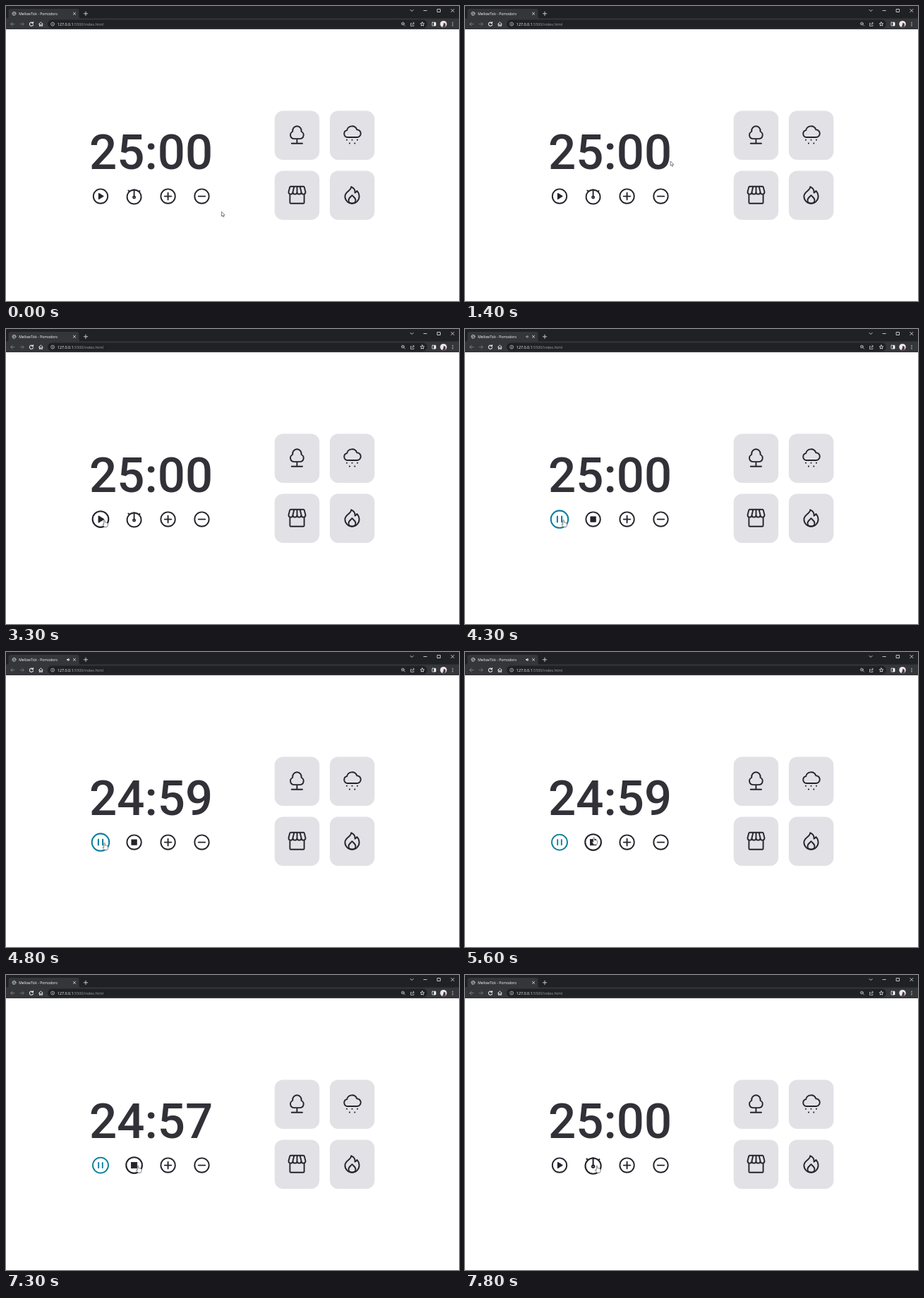
These frames come from a looping animation (642 px wide and 418 px high, 8000 ms). An HTML page:

```html
<!DOCTYPE html>
<html lang="en">
<head>
<meta charset="utf-8">
<title>MellowTick - Pomodoro</title>
<style>
  html, body { margin: 0; width: 100%; height: 100%; overflow: hidden; background: #fff; }
  svg { display: block; }
  .ui { font-family: "Open Sans", "Noto Sans", sans-serif; }
  .line { fill: none; stroke-linecap: round; stroke-linejoin: round; }
  .icon { stroke: #25242c; stroke-width: 1.9; }
  #clock { font: 500 69px Roboto, sans-serif; fill: #323138; }
</style>
</head>
<body>
<svg width="642" height="418" viewBox="0 0 642 418">
  <defs>
    <g id="ring"><circle class="line" r="10.2"/></g>
    <rect id="card" width="63.5" height="69.5" rx="12" fill="#e1e1e6"/>
  </defs>
  <rect width="642" height="418" fill="#fff"/>

  <!-- browser frame -->
  <rect width="642" height="33" fill="#202124"/>
  <path d="M0 17.5H1.5Q3.5 17.5 3.5 15.5V7Q3.5 4 6.5 4H100.5Q103.5 4 103.5 7V15.5Q103.5 17.5 105.5 17.5H642V33H0Z" fill="#35363a"/>
  <rect x="59" y="19.5" width="538" height="12" rx="6" fill="#202124"/>
  <g class="ui">
    <text x="18.3" y="12.6" font-size="5" fill="#fff">MellowTick - Pomodoro</text>
    <text x="72.8" y="27.6" font-size="5.4" fill="#fff">127.0.0.1<tspan fill="#9aa0a6">:5500/index.html</tspan></text>
  </g>
  <g class="line" stroke="#dfe1e5" stroke-width=".85">
    <g stroke="#b4b7bb"><circle cx="11.5" cy="10.8" r="2.5"/><path d="M9.2 10.2l2.2.6-.4 2.3M11.3 8.5l.8 1.5 1.8.2"/></g>
    <path d="M95.4 9.2l3.2 3.2m0-3.2l-3.2 3.2M110.3 10.8h5.4m-2.7-2.7v5.4"/>
    <path d="M573 5.4l2.1 2.1 2.1-2.1M592 6.5h4.3M611.5 4.5h4v4h-4zM630.8 4.4l4.2 4.2m0-4.2l-4.2 4.2"/>
    <path d="M12 25.6H6.8m2.4-2.5l-2.5 2.5 2.5 2.5" stroke="#85888c"/>
    <path d="M20 25.6h5.2m-2.4-2.5l2.5 2.5-2.5 2.5" stroke="#74777b"/>
    <path d="M38 24.1a2.6 2.6 0 1 0 .5 2.2M38.5 22.6v1.9h-1.9" stroke-width="1.1"/>
    <path d="M46.6 25.6l2.8-2.6 2.8 2.6M47.4 25.2v3.2h1.4v-1.9h1.2v1.9h1.4v-3.2" stroke-width="1"/>
    <g stroke="#aeb1b5"><circle cx="66.1" cy="25.6" r="2.5"/><path d="M66.1 25.4v1.5M66.1 24.2v.05"/></g>
    <g stroke="#b9bcc0">
      <circle cx="562.4" cy="25" r="1.9"/><path d="M563.8 26.4l1.7 1.7M561.6 25h1.6"/>
      <path d="M574.6 24.4h-1.1v4h4.4v-1.5M575.2 26.4q.3-2 3-2.1m-1.2-1.3l1.4 1.3-1.4 1.3"/>
    </g>
    <path d="M590 22.8l.8 1.8 2 .2-1.5 1.3.4 2-1.7-1-1.7 1 .4-2-1.5-1.3 2-.2z"/>
    <rect x="604" y="23.2" width="5" height="4.8" rx=".4"/>
  </g>
  <rect x="606.6" y="23.2" width="2.4" height="4.8" fill="#fff"/>
  <circle cx="620" cy="25.6" r="4.7" fill="#efe6e8"/>
  <path d="M620.2 24.2q2.2-.6 2.6 1.4t-.4 4a4.7 4.7 0 0 1-4 .4q1.8-2.4 1.8-5.8z" fill="#463c42"/>
  <g fill="#dfe1e5"><circle cx="633" cy="23.4" r=".7"/><circle cx="633" cy="25.6" r=".7"/><circle cx="633" cy="27.8" r=".7"/></g>
  <g id="speaker">
    <path d="M86 10.2h1.2l1.5-1.4v4.2l-1.5-1.4H86z" fill="#fff"/>
    <path class="line" d="M89.5 9.7q1.1 1.2 0 2.4" stroke="#fff" stroke-width=".7"/>
  </g>

  <!-- sound cards -->
  <use href="#card" x="380.7" y="148.6"/><use href="#card" x="458.9" y="148.6"/>
  <use href="#card" x="380.7" y="233.4"/><use href="#card" x="458.9" y="233.4"/>
  <g class="line icon">
    <path d="M407.8 188.1a5.3 5.3 0 0 1-1.6-10.1a6.3 6.6 0 1 1 12.4 0a5.3 5.3 0 0 1-1.6 10.1zM412.4 188.1v6.5M404.8 194.7h15.2"/>
    <path d="M483.5 186a5 5 0 0 1-.4-9.8a7.4 7.4 0 0 1 14.2-1a5.4 5.4 0 0 1 .2 10.8z"/>
    <path d="M483 189.8v.01M490.5 189.8v.01M498 189.8v.01M487 194.6v.01M494.3 194.6v.01" stroke-width="2.1"/>
    <path transform="translate(0 .4)" d="M403.6 255.3h17.8q1.1 0 1.4 1l1.7 6.7a3 3.2 0 0 1-6 0a3 3.2 0 0 1-6 0a3 3.2 0 0 1-6 0a3 3.2 0 0 1-6 0l1.7-6.7q.3-1 1.4-1zM408.4 255.3l-1.9 7.7M412.5 255.3v7.7M416.6 255.3l1.9 7.7M402.4 266v12q0 1.4 1.4 1.4h17.4q1.4 0 1.4-1.4v-12"/>
    <path d="M489.2 256.2c0 5.5-8.8 6.8-8.8 13.6a10.1 10 0 0 0 20.2 0c0-3.4-1.3-5.9-3.2-7.9c-.6 1.6-1.5 2.4-2.8 2.8c.4-3.4-1.8-6.9-5.4-8.5z"/>
    <path d="M490.5 268.2c-1.8 2.1-5 3.8-5 6.8a5 4.8 0 0 0 10 0c0-3-3.2-4.7-5-6.8z"/>
  </g>

  <!-- timer -->
  <text id="clock" x="118" y="231.2">25:00</text>
  <g class="icon">
    <g id="left">
      <g id="play"><use href="#ring"/><path d="M-2.5-4L4 0L-2.5 4z" fill="#25242c" stroke-width="1.2" stroke-linejoin="round"/></g>
      <g id="pause" stroke="#087d9b" stroke-width="1.7"><use href="#ring"/><path class="line" d="M-2.6-3.3v6.6M2.6-3.3v6.6"/></g>
    </g>
    <g id="right">
      <g id="set" class="line">
        <circle cy=".9" r="10"/><circle cy="1.5" r="1.5"/>
        <path d="M0-9.4V-.2M-8.2-8.2l1 1M7.9-7.6l-.7.7"/>
      </g>
      <g id="stop"><use href="#ring"/><rect x="-3.7" y="-3.7" width="7.4" height="7.4" fill="#25242c" stroke-width=".8"/></g>
    </g>
    <g transform="translate(229.6 269.6)"><use href="#ring"/><path class="line" d="M-4.8 0h9.6M0-4.8v9.6"/></g>
    <g transform="translate(277.5 269.6)"><use href="#ring"/><path class="line" d="M-4.8 0h9.6"/></g>
  </g>

  <!-- pointer -->
  <g id="cursor" stroke="#333" stroke-width=".6" fill="#fff" stroke-linejoin="round">
    <path id="arrow" d="M0 0V6.5L1.5 5.2L2.5 7.5L3.6 7L2.6 4.8H4.7z"/>
    <path id="hand" d="M-.8.9Q-.8 0 0 0T.8.9V3.5Q1.9 2.9 2.4 3.8Q3.4 3.3 3.8 4.2Q5 3.9 5 5V7.2Q4.8 8.8 3.9 10H-.1Q-.7 8.6-2.4 6.8Q-2.6 5.7-1.6 5.8L-.8 6.5z"/>
  </g>
</svg>
<script>
const LOOP = 8000, STEP = 100, GROW = 200;
const $ = id => document.getElementById(id);
const show = (id, on) => $(id).setAttribute("visibility", on ? "visible" : "hidden");
const ramp = (t, a, b) => Math.min(1, Math.max(0, (t - a) / (b - a)));

// time, x, y of the pointer tip
const path = [
  [400, 305.5, 291.5], [600, 304.5, 276.5], [900, 304.5, 276.5], [1500, 288.5, 208.5],
  [1700, 288.5, 208.5], [1900, 298, 238], [2000, 270, 265], [2100, 200, 275],
  [2200, 155.8, 277.3], [2400, 144, 274], [2600, 140.5, 271], [2700, 139.5, 270.8],
  [3200, 139.5, 270.8], [3300, 139.4, 270.6], [5000, 139.6, 270.6], [5300, 162, 268],
  [5600, 182.6, 263], [5700, 182.6, 263], [6100, 187, 270.3]
];

function tip(t) {
  if (t <= path[0][0]) return path[0].slice(1);
  const i = path.findIndex(p => p[0] > t);
  if (i < 0) return path[path.length - 1].slice(1);
  const a = path[i - 1], b = path[i], k = ramp(t, a[0], b[0]);
  return [a[1] + (b[1] - a[1]) * k, a[2] + (b[2] - a[2]) * k];
}

function place(id, x, y, scale) {
  $(id).setAttribute("transform", `translate(${x} ${y}) scale(${scale})`);
}

function draw(t) {
  const running = t >= 3800 && t < 7800;
  const onLeft = t >= 2400 && t < 5200, onRight = t >= 5400;

  const gone = running ? Math.floor((t - 3800) / 1000) : 0;
  const left = 1500 - gone;
  const two = n => String(n).padStart(2, "0");
  $("clock").textContent = two(Math.floor(left / 60)) + ":" + two(left % 60);

  show("play", !running);
  show("pause", running);
  show("set", !running);
  show("stop", running);
  const hoverL = 1 + .11 * (ramp(t, 2300, 2300 + GROW) - ramp(t, 5100, 5100 + GROW));
  const hoverR = 1 + .11 * ramp(t, 5300, 5300 + GROW);
  place("left", 134, 269.6, hoverL * (running ? 1.08 : 1));
  place("right", 181.6, 269.6, hoverR);

  $("speaker").setAttribute("opacity", ramp(t, 4200, 4400) - ramp(t, 6600, 7300));

  const [x, y] = tip(t);
  place("cursor", x, y, 1);
  show("hand", onLeft || onRight);
  show("arrow", !onLeft && !onRight);
}

const start = performance.now();
function tick(now) {
  const t = Math.max(0, now - start) % LOOP;
  draw(Math.floor(t / STEP) * STEP);
  requestAnimationFrame(tick);
}
draw(0);
requestAnimationFrame(tick);
</script>
</body>
</html>
```
